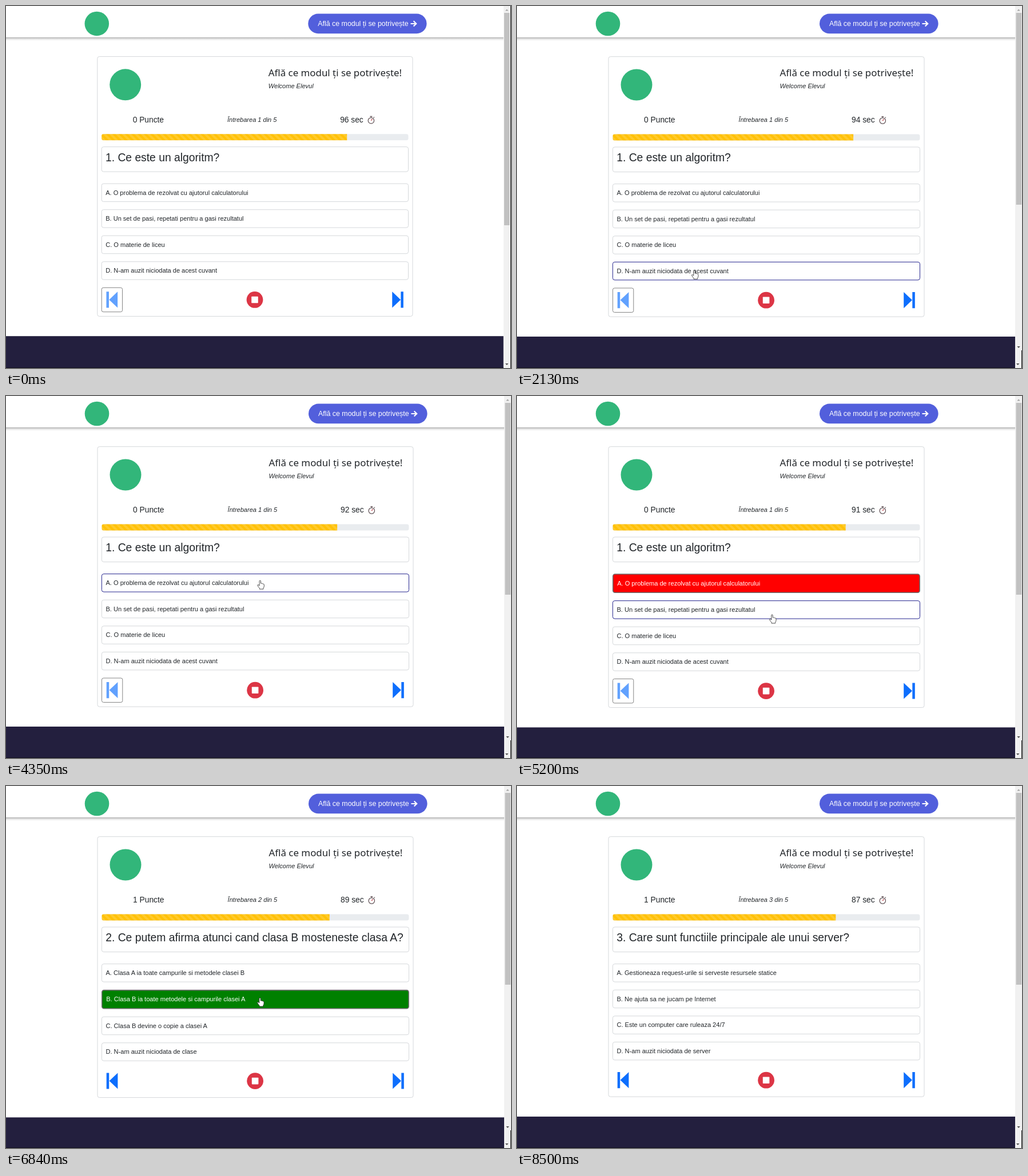
These frames come from a looping animation (883 by 634 pixels, 8.66 s). An HTML page:

```html
<!DOCTYPE html>
<html lang="ro">
<head>
<meta charset="utf-8">
<title>Quiz</title>
<style>
html, body { margin: 0; width: 100%; height: 100%; overflow: hidden; background: #fff; }
svg { display: block; width: 883px; height: 634px; font-family: "Liberation Sans", Arial, sans-serif; }
text { fill: #212529; white-space: pre; }
.box { fill: #fff; stroke: #d5d8db; stroke-width: 1; }
.small { font-size: 11.05px; }
.mid { font-size: 13.8px; }
.big { font-size: 19.32px; }
.it { font-style: italic; }
</style>
</head>
<body>
<svg viewBox="0 0 883 634">
  <defs>
    <pattern id="stripes" width="7.8" height="7.8" patternUnits="userSpaceOnUse" patternTransform="rotate(-45)">
      <rect width="7.8" height="7.8" fill="#ffc107"/>
      <rect width="3.9" height="7.8" fill="#ffca2c"/>
    </pattern>
    <clipPath id="track"><rect x="167.3" y="224.5" width="537.2" height="11" rx="3.5"/></clipPath>
    <linearGradient id="shade" x2="0" y2="1">
      <stop offset="0" stop-color="#000" stop-opacity=".34"/>
      <stop offset=".4" stop-color="#000" stop-opacity=".12"/>
      <stop offset="1" stop-color="#000" stop-opacity="0"/>
    </linearGradient>
  </defs>
  <rect width="883" height="634" fill="#fff"/>

  <g id="barA">
    <rect x="870" width="12" height="634" fill="#f1f1f1"/>
    <rect x="871" y="12" width="9.5" height="372" fill="#c1c1c1"/>
    <path d="M873 8.5l2.7-3 2.7 3z" fill="#a3a3a3"/>
    <path d="M873 626l2.7 3 2.7-3z" fill="#505050"/>
    <rect x="882" width="1" height="634" fill="#111"/>
  </g>

  <g id="page">
    <rect width="871" height="579" fill="#fff"/>
    <rect y="55" width="871" height="6" fill="url(#shade)"/>
    <circle cx="159" cy="31" r="21.3" fill="#32b67a"/>
    <rect x="529" y="13.6" width="207.6" height="34.6" rx="17.3" fill="#525fdc"/>
    <text x="546" y="35.3" font-size="12.42" style="fill:#fff">Află ce modul ți se potrivește</text>
    <path d="M708.5 31h9M713.6 26.4l4.7 4.6-4.7 4.6" fill="none" stroke="#fff" stroke-width="2.1"/>

    <rect id="card" class="box" x="160" y="88.7" width="552" height="455.5" rx="3.5"/>
    <circle cx="209" cy="138" r="27.5" fill="#32b67a"/>
    <text x="459.5" y="123" font-size="16.9" style="font-family:'Noto Sans',sans-serif">Află ce modul ți se potrivește!</text>
    <text class="small it" x="459.5" y="144.3">Welcome Elevul</text>
    <text class="mid" id="score" x="222" y="204.4"></text>
    <text class="small it" id="count" x="387.6" y="202.9"></text>
    <text class="mid" id="secs" x="585" y="204.4"></text>
    <g fill="none" stroke="#66585c" stroke-width="1.3">
      <circle cx="639.3" cy="201" r="5.2"/>
      <path d="M637.3 193.6h4M639.3 194v2M643.6 196l1.2-1.2"/>
      <path d="M639.3 201l2-2.8" stroke="#c0464e"/>
    </g>
    <g clip-path="url(#track)">
      <rect x="167" y="224" width="539" height="12" fill="#e9ecef"/>
      <rect id="fill" x="167.3" y="224" height="12" fill="url(#stripes)"/>
    </g>
    <rect class="box" x="167.4" y="247" width="537.1" height="43.6" rx="3.5"/>
    <text class="big" id="ask" x="174.2" y="272.2"></text>
    <g id="answers"></g>

    <g id="lower">
      <rect id="focus" x="167.5" y="494" width="36.3" height="42.5" rx="3" fill="#fff" stroke="#858585"/>
      <path id="prev" d="M175.7 501h4.5v28.2h-4.5zM195.4 501v28.2l-14.8-14.1z" fill="#0d6efd"/>
      <circle cx="435.6" cy="515.2" r="14.4" fill="#dc3545"/>
      <rect x="429.8" y="509.4" width="11.6" height="11.6" rx=".8" fill="#fff"/>
      <path d="M695.8 501h-4.5v28.2h4.5zM676.2 501v28.2l14.8-14.1z" fill="#0d6efd"/>
      <rect y="579" width="871" height="62" fill="#231f3e"/>
    </g>
  </g>

  <g id="barB">
    <rect x="871" width="12" height="603" fill="#f1f1f1"/>
    <rect x="872.6" y="12" width="9.6" height="336" fill="#c1c1c1"/>
    <path d="M874.4 8.5l2.7-3 2.7 3z" fill="#a3a3a3"/>
    <path d="M874.4 596l2.7 3 2.7-3z" fill="#505050"/>
  </g>
  <rect y="633" width="870" height="1" fill="#110f20"/>

  <g fill="#fff" stroke="#222" stroke-width=".8" stroke-linejoin="round">
    <path id="arrow" d="M0 0v11.6l2.7-2.5 1.8 4.1 1.9-.8-1.8-4h3.6z"/>
    <path id="hand" d="M-1.2 9V1Q-1.1 0 0 0T1.2 1V5Q2.5 4.4 3.3 5.5 4.5 4.9 5.2 6 6.9 5.7 7 7.2V10.2Q6.8 12 5.7 13.3V15H-1V13.4Q-3.2 11.4-4.4 8.6-4.6 7.3-3.4 7.4-2.2 7.8-1.2 9z"/>
  </g>
</svg>
<script>
const LOOP = 8660, TICK = 941, FIRST_TICK = 650, SLIDE = 560;
const START = 96, TOTAL = 120, WIDTH = 537.2;
const NAVY = '#26268f';

const quiz = [
  { ask: '1. Ce este un algoritm?', from: 0, click: 4650, pick: 0, color: '#f00', answers: [
    'A. O problema de rezolvat cu ajutorul calculatorului',
    'B. Un set de pasi, repetati pentru a gasi rezultatul',
    'C. O materie de liceu',
    'D. N-am auzit niciodata de acest cuvant'] },
  { ask: '2. Ce putem afirma atunci cand clasa B mosteneste clasa A?', from: 5590, click: 6840, pick: 1, color: '#008000', answers: [
    'A. Clasa A ia toate campurile si metodele clasei B',
    'B. Clasa B ia toate metodele si campurile clasei A',
    'C. Clasa B devine o copie a clasei A',
    'D. N-am auzit niciodata de clase'] },
  { ask: '3. Care sunt functiile principale ale unui server?', from: 7780, click: Infinity, pick: -1, answers: [
    'A. Gestioneaza request-urile si serveste resursele statice',
    'B. Ne ajuta sa ne jucam pe Internet',
    'C. Este un computer care ruleaza 24/7',
    'D. N-am auzit niciodata de server'] }
];

// time, x, y of the pointer tip
const path = [
  [650, 102, 235], [820, 120, 212], [1120, 155, 167], [1280, 155, 167],
  [1450, 176, 133], [1700, 245, 240], [1900, 295, 390], [2130, 310, 463],
  [2220, 306, 480], [2320, 300, 495], [2540, 284, 400], [2850, 258, 250],
  [3010, 262, 240], [3170, 279, 221], [3250, 279, 221], [3550, 340, 180],
  [3800, 400, 228], [4030, 430, 282], [4110, 434, 290], [4300, 444, 322],
  [4650, 446, 330], [4800, 446, 383], [5270, 446, 383], [5820, 446, 317],
  [5980, 446, 317], [6600, 444, 371], [7250, 444, 371], [7600, 380, 290],
  [7900, 250, 205], [8110, 160, 175]
];

const $ = id => document.getElementById(id);
const set = (el, attrs) => { for (const k in attrs) el.setAttribute(k, attrs[k]); };
const show = (el, on) => set(el, { visibility: on ? 'visible' : 'hidden' });
const write = (el, s) => { if (el.textContent !== s) el.textContent = s; };
const make = (tag, attrs) => {
  const el = document.createElementNS('http://www.w3.org/2000/svg', tag);
  set(el, attrs);
  return $('answers').appendChild(el);
};

const rows = [0, 1, 2, 3].map(() => ({
  box: make('rect', { class: 'box', rx: 3.5 }),
  label: make('text', { class: 'small' })
}));

// cubic-bezier(.25, .1, .25, 1)
function ease(p) {
  if (p >= 1) return 1;
  const curve = (s, a, b) => 3 * (1 - s) ** 2 * s * a + 3 * (1 - s) * s * s * b + s ** 3;
  let lo = 0, hi = 1;
  for (let i = 0; i < 20; i++) {
    const m = (lo + hi) / 2;
    if (curve(m, .25, .25) < p) lo = m; else hi = m;
  }
  return curve(lo, .1, 1);
}

function pointer(t) {
  const i = path.findIndex(k => k[0] > t);
  if (i < 1) return null;
  const [t0, x0, y0] = path[i - 1], [t1, x1, y1] = path[i];
  const p = (t - t0) / (t1 - t0);
  return { x: x0 + (x1 - x0) * p, y: y0 + (y1 - y0) * p };
}

function drawAnswers(q, picked, pos) {
  let over = false, shift = 0;
  rows.forEach(({ box, label }, i) => {
    const sel = picked && i === q.pick;
    const y = 311.6 + 45.6 * i + shift, h = sel ? 33 : 31.5;
    const hover = pos && pos.x > 167 && pos.x < 705 && pos.y > y && pos.y < y + h;
    over = over || hover;
    const d = sel ? .4 : 0;
    set(box, { x: 167.4 + d, y: y + d, width: 537.1 - 2 * d, height: h - 2 * d });
    box.style.fill = sel ? q.color : '#fff';
    box.style.stroke = sel ? '#6b6b6b' : hover ? NAVY : '#d5d8db';
    box.style.strokeWidth = sel ? 1.6 : 1;
    set(label, { x: sel ? 175.2 : 174.5, y: y + (sel ? 20.1 : 19.4) });
    label.style.fill = sel ? '#fff' : '#212529';
    write(label, q.answers[i]);
    if (sel) shift = 1.4;
  });
  return over;
}

function draw(t) {
  const settled = t >= 100;
  set($('page'), { transform: `scale(${settled ? 1 : .9986})` });
  show($('barB'), settled);

  const n = Math.max(0, Math.floor((t - FIRST_TICK) / TICK) + 1);
  const since = t - FIRST_TICK - (n - 1) * TICK;
  const left = n ? START - n + 1 - ease(since / SLIDE) : START;
  set($('fill'), { width: WIDTH * left / TOTAL });
  write($('secs'), `${START - n} sec`);

  const index = quiz.findLastIndex(q => t >= q.from);
  const q = quiz[index], picked = t >= q.click;
  write($('score'), `${t >= quiz[1].click ? 1 : 0} Puncte`);
  write($('count'), `Întrebarea ${index + 1} din 5`);
  write($('ask'), q.ask);

  const pos = pointer(t);
  const over = drawAnswers(q, picked, pos);
  const shift = picked ? 1.4 : 0;
  set($('card'), { height: 455.5 + shift });
  set($('lower'), { transform: `translate(0 ${shift})` });
  show($('focus'), index === 0);
  set($('prev'), { opacity: index ? 1 : .65 });

  show($('arrow'), pos && !over);
  show($('hand'), pos && over);
  if (pos) set($(over ? 'hand' : 'arrow'), { transform: `translate(${pos.x} ${pos.y})` });
}

const begin = performance.now();
function frame() {
  draw((performance.now() - begin) % LOOP);
  requestAnimationFrame(frame);
}
frame();
</script>
</body>
</html>
```
